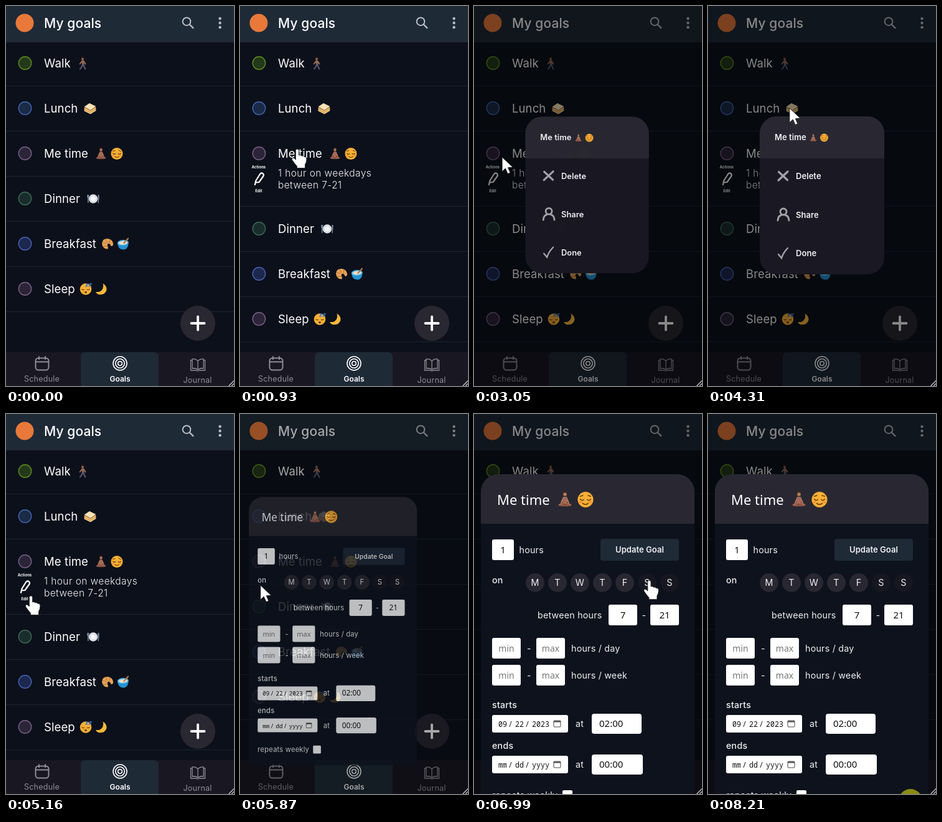
An HTML page that plays this animation: 366x606 px, repeating every 8.29 s.

```html
<!DOCTYPE html>
<html lang="en">
<head>
<meta charset="utf-8">
<title>My goals</title>
<style>
  html, body { margin: 0; width: 100%; height: 100%; overflow: hidden; background: #0c101b; }
  svg { display: block; }
  text { font-family: Inter, sans-serif; fill: #fff; white-space: pre; }
  .title { font-size: 21px; font-weight: 500; letter-spacing: .1px; }
  .row { font-size: 18.5px; letter-spacing: .1px; }
  .sub { font-size: 15.5px; font-weight: 300; letter-spacing: .4px; fill: #f2f2f4; }
  .tiny { font-size: 6px; font-weight: 700; text-anchor: middle; }
  .nav { font-size: 12.6px; letter-spacing: .2px; text-anchor: middle; fill: #8d8d96; }
  .on { font-weight: 600; font-size: 12px; letter-spacing: 0; fill: #fff; }
  .menu { font-size: 13px; font-weight: 600; letter-spacing: .05px; fill: #f0f0f2; }
  .form { font-size: 14.3px; letter-spacing: .2px; fill: #f0f0f2; }
  .mid { text-anchor: middle; }
  .bold { font-weight: 500; }
  .head { font: 22px "Noto Sans", sans-serif; }
  .field { font: 15px "Noto Sans", sans-serif; fill: #111; }
  .hint { font-size: 14px; fill: #777; }
  .date { font: 11.7px "Noto Sans Mono", monospace; fill: #111; }
</style>
</head>
<body>
<svg id="stage" width="366" height="606" viewBox="0 0 366 606">
  <defs>
    <g id="walk" fill="none" stroke-linecap="round" stroke-linejoin="round">
      <circle cy="-7.2" r="2" fill="#a86f4c"/>
      <path d="M-1.6-8.2Q0-10.6 2-8" stroke="#3a2822" stroke-width="1.6"/>
      <path d="M.3-3.5L.6 1.5" stroke="#7d6a6c" stroke-width="3.6"/>
      <path d="M-1-3.5L-4.4.8M1.7-3.5L4.6 1" stroke="#b0744e" stroke-width="1.7"/>
      <path d="M.3 2L-1.2 5L-4 8.8M1 2L2.6 5.3L4.2 9" stroke="#5b5a70" stroke-width="2.1"/>
    </g>
    <g id="sandwich">
      <path d="M-9.3-2L0-7L9.3-2V3.4L.5 9L-9.3 4Z" fill="#a9683a"/>
      <path d="M-9.3-3L-1-8.4L9.3-3.4L.5 2.4Z" fill="#f8e3b4"/>
      <path d="M-9.3-.4L.5 4.6L9.3-1" fill="none" stroke="#f2dcae" stroke-width="1.3"/>
      <path d="M-9.3 1.4L.5 6.3L9.3.8" fill="none" stroke="#f0bb3c" stroke-width="1.3"/>
      <path d="M-9.3 3.2L.5 8.1L9.3 2.6" fill="none" stroke="#f2dcae" stroke-width="1.3"/>
    </g>
    <g id="calm">
      <path d="M-2.4-5.8Q-2.8-9.4 0-9.4T2.4-5.8Z" fill="#4a2f28"/>
      <circle cy="-5.8" r="2.1" fill="#b57b58"/>
      <path d="M-2.2-3H2.2L5.4 4.4L4 5.2L2.3 2V5H-2.3V2L-4 5.2L-5.4 4.4Z" fill="#b57b58"/>
      <path d="M-2.2-3H2.2L2.6 4H-2.6Z" fill="#a3685c"/>
      <path d="M-8.2 7Q-5 3.4 0 4.4Q5 3.4 8.2 7Q6 9 0 8.2Q-6 9-8.2 7Z" fill="#a8654f"/>
      <path d="M-6.5 8L2 5.8M6.5 8L-2 5.8" stroke="#7c4a3c" fill="none"/>
    </g>
    <g id="relief">
      <circle r="9.5" fill="#fbb034"/>
      <g fill="none" stroke="#6b3f14" stroke-width="1.2" stroke-linecap="round">
        <path d="M-6.4-.5Q-4.2 2-2 0M6.4-.5Q4.2 2 2 0M-3.4 4.4Q0 7.4 3.4 4.4"/>
        <path d="M-6.4-4L-3.2-5M6.4-4L3.2-5"/>
      </g>
      <path d="M-7.6 3h3M4.6 3h3" stroke="#ee7f3a" stroke-width="1.6"/>
    </g>
    <g id="plate">
      <circle r="7.2" fill="#dfe3e9"/>
      <circle r="4.8" fill="#f4f5f8" stroke="#c4cad3" stroke-width=".7"/>
      <path d="M-8.2-6.5V6.5M8.2-6.5V6.5" stroke="#8296aa" stroke-width="1.4"/>
      <path d="M-9.2-6.5V-2H-7.2V-6.5M9-6V1H8" fill="none" stroke="#8296aa"/>
    </g>
    <g id="croissant">
      <path d="M-9-1Q-8-8.6 0-8.4Q8-7.6 9.2 0Q9 3.8 5.6 3.4Q4.6-.4 1.4-.8Q-1 .2 0 3.4Q1.6 5.4.6 8Q-8 8.6-9-1Z" fill="#e6a356"/>
      <path d="M-8.2-3L-2-.6M-3.6-7.6L0-2M4-7L3-1M-7.4 4.2L-.6 3.2" stroke="#b06f33" fill="none"/>
    </g>
    <g id="bowl">
      <path d="M-9-2.5Q-8.6 9 1 9Q8.6 8.4 8.6-2.5Z" fill="#2492d3"/>
      <ellipse cy="-2" rx="9" ry="4.4" fill="#4fb5e6" transform="rotate(-4)"/>
      <ellipse cy="-1.8" rx="7" ry="2.9" fill="#eadfce" transform="rotate(-4)"/>
      <path d="M1.4-1.4L8-8.8" stroke="#b87945" stroke-width="2.2" stroke-linecap="round"/>
    </g>
    <g id="sleepy">
      <circle r="9.3" fill="#fbb034"/>
      <path d="M-6.5 0Q-4.5 2-2.2 .4M2 .4Q4.2 2 6.2 0" fill="none" stroke="#6b3f14" stroke-width="1.2"/>
      <ellipse cy="5" rx="2" ry="1.7" fill="#6b3f14"/>
      <path d="M0-8h3.4L0-4.6h3.4M5.4-8.6h3.6L5.4-5h3.6" fill="none" stroke="#3f79c9" stroke-width="1.3"/>
    </g>
    <path id="moon" d="M2.4-9Q9.4-5 8.4 1.8Q6 9-2.2 8.8Q-7 8.2-9 4.4Q-1.6 5.4 1.6.4Q4.2-4 2.4-9Z" fill="#f9b93a"/>
  </defs>
  <g id="page"></g>
  <rect id="mask" width="366" height="606" fill="#000"/>
  <g id="menu"></g>
  <g id="form"></g>
  <circle id="halo" cx="325" cy="617" r="19" fill="#8b8a14"/>
  <g id="cursor" fill="#fff" stroke="#111" stroke-width=".8" stroke-linejoin="round">
    <path id="arrow" d="M0 0V23L5.3 18L9.2 26.5L13 24.8L9.4 16.6L17 16Z"/>
    <path id="hand" transform="translate(1 0)" d="M-2.6 2.6a2.6 2.6 0 0 1 5.2 0V10Q5.4 8.6 6.8 11Q9.6 10 10.9 12.4Q15 12 15 16.4Q15 21 12.5 25V30.5H-.5V27.5Q-4 24-8.3 17.6Q-9.4 14.6-7 14Q-5 14-2.6 17Z"/>
  </g>
  <path d="M357.5 606L366 597.5M362 606L366 602" stroke="#c9c9cc" stroke-width="1.3"/>
</svg>
<script>
const LOOP = 8290, GROW = 48;
const $ = id => document.getElementById(id);
const clamp = v => Math.max(0, Math.min(1, v));

const text = (x, y, cls, s) => `<text x="${x}" y="${y}" class="${cls}">${s}</text>`;
const box = (x, y, w, h, r, fill) =>
  `<rect x="${x}" y="${y}" width="${w}" height="${h}" rx="${r}" fill="${fill}"/>`;
const dot = (x, y, r, attrs) => `<circle cx="${x}" cy="${y}" r="${r}" ${attrs}/>`;
const line = (d, color, w, extra = '') =>
  `<path d="${d}" fill="none" stroke="${color}" stroke-width="${w}" ${extra}/>`;
const emoji = (id, x, y, s = 1) =>
  `<use href="#${id}" transform="translate(${x} ${y}) scale(${s})"/>`;

const goals = [
  ['Walk', '#5f8f22', '#24391a', [['walk', 123]]],
  ['Lunch', '#4066b0', '#1a2b47', [['sandwich', 135]]],
  ['Me time', '#7a6285', '#2c2438', [['calm', 152.5], ['relief', 178]]],
  ['Dinner', '#3a6b55', '#1a2d2d', [['plate', 140]]],
  ['Breakfast', '#4863b6', '#1c284e', [['croissant', 163], ['bowl', 188]]],
  ['Sleep', '#7a6285', '#2c2438', [['sleepy', 128], ['moon', 153]]],
];

function goalRow([name, edge, fill, icons], i) {
  const y = 91 + 72 * i;
  return dot(30.5, y, 10.2, `fill="${fill}" stroke="${edge}" stroke-width="1.4"`) +
    text(61, y + 7, 'row', name) + icons.map(([id, x]) => emoji(id, x, y + .5)).join('');
}
const rule = i => line(`M0 ${127.5 + 72 * i}H366`, '#1d2430', 1);

function header() {
  const c = '#b8bec6';
  return box(0, 0, 366, 58, 0, '#1f2a37') + dot(30, 27, 14.5, 'fill="#e8793a"') +
    text(61, 35, 'title', 'My goals') +
    dot(290, 24.7, 6.3, `fill="none" stroke="${c}" stroke-width="2"`) +
    line('M294.8 29.5L301 35.7', c, 2.4) +
    [20, 27, 34].map(y => dot(343.5, y, 2.2, `fill="${c}"`)).join('');
}

function navBar() {
  const c = '#8d8d96';
  return box(0, 552, 366, 54, 0, '#191722') +
    '<path d="M120 606V560q0-8 8-8H237q8 0 8 8V606Z" fill="#1f2a37"/>' +
    `<rect x="47.5" y="561.5" width="21" height="19" rx="4.5" fill="none" stroke="${c}" stroke-width="2"/>` +
    line('M48 567.5H68M53 558.5V564M63 558.5V564', c, 2) +
    [11, 7.2, 3.3].map(r => dot(183, 570, r, 'fill="none" stroke="#fff" stroke-width="1.6"')).join('') +
    line('M308 566Q304 562 299 563V578Q304 577 308 580Q312 577 317 578V563Q312 562 308 566V580M299 565H296.5V581H305L308 582L311 581H319.5V565H317', c, 1.3) +
    text(57.5, 599, 'nav', 'Schedule') + text(183, 599, 'nav on', 'Goals') +
    text(307.5, 601, 'nav', 'Journal');
}

function details() {
  return `<svg id="details" y="247" width="366" height="72"><g transform="translate(0 -247)">
    ${text(30, 259, 'tiny', 'Actions')}
    ${line('M24 285L25.5 278.5L32.5 267.5Q35 265.5 37 267.5T37 272L30.5 281L25.5 281.5', '#fff', 2.2, 'stroke-linejoin="round" stroke-linecap="round"')}
    ${text(30, 297, 'tiny', 'Edit')}
    ${text(61, 272, 'sub', '1 hour on weekdays')}${text(61, 291, 'sub', 'between 7-21')}
    </g></svg>`;
}

$('page').innerHTML = box(0, 0, 366, 606, 0, '#0c101b') +
  goals.slice(0, 3).map(goalRow).join('') + rule(0) + rule(1) + details() +
  '<g id="lower">' + goals.slice(3).map((g, i) => goalRow(g, i + 3)).join('') +
  [2, 3, 4, 5].map(rule).join('') + '</g>' + header() + navBar() +
  dot(308, 506, 28, 'fill="#292731"') +
  line('M297.5 506H318.5M308 495.5V516.5', '#fff', 3.8, 'stroke-linecap="round"');

const grey = '#a3a3a7';
$('menu').innerHTML = box(83, 176, 200, 252, 27, '#191823') +
  '<path d="M83 243V203a27 27 0 0 1 27-27H256a27 27 0 0 1 27 27V243Z" fill="#292832"/>' +
  text(107, 214, 'menu', 'Me time') + emoji('calm', 169, 210, .66) + emoji('relief', 186.5, 210, .68) +
  line('M113.5 264.5L127.5 277.5M128 264L113 278', grey, 3.2, 'stroke-linecap="round"') +
  dot(121, 328, 5, `fill="none" stroke="${grey}" stroke-width="2.8"`) +
  line('M112 342Q112.5 334.5 118 333.5M124 333.5Q129.5 334.5 130 342', grey, 2.8, 'stroke-linecap="round"') +
  line('M113 396L118 402Q121 393 128 386', grey, 2.4, 'stroke-linecap="round"') +
  ['Delete', 'Share', 'Done'].map((s, i) => text(141, 276 + 61.5 * i, 'menu', s)).join('');

const field = (x, y, w, h, s, cls = '') =>
  box(x, y, w, h, 3, '#fff') + text(x + w / 2, y + h / 2 + 5.4, 'field mid ' + cls, s);

function limits(y, unit) {
  return field(29, y, 46, 33, 'min', 'hint') + text(85, y + 22, 'form', '-') +
    field(100, y, 46, 33, 'max', 'hint') + text(156, y + 22, 'form', 'hours / ' + unit);
}

function moment(y, label, parts, time, w) {
  const [a, b, c] = parts;
  return text(29, y - 11, 'form bold', label) + box(29, y, 122, 28, 3, '#fff') +
    [[39, a], [55, '/'], [66, b], [82, '/'], [93, c]].map(([x, s]) => text(x, y + 19, 'date', s)).join('') +
    `<rect x="128" y="${y + 9}" width="11" height="10" rx="1" fill="none" stroke="#444"/>` +
    line(`M128 ${y + 10.5}H139`, '#444', 2) +
    text(163, y + 19, 'form', 'at') + box(189, y - 2, w, 32, 4, '#fff') +
    text(201, y + 19, 'field', time);
}

$('form').innerHTML =
  '<path d="M11 640V124a28 28 0 0 1 28-28H326a28 28 0 0 1 28 28V640Z" fill="#0d121d"/>' +
  '<path d="M11 175V124a28 28 0 0 1 28-28H326a28 28 0 0 1 28 28V175Z" fill="#292832"/>' +
  text(37, 145, 'head', 'Me time') + emoji('calm', 146, 136, 1.32) + emoji('relief', 179, 136.5, 1.32) +
  '<rect id="caret" x="195" y="121" width="1.2" height="30" fill="#fff"/>' +
  field(29, 200, 35, 33, '1') + text(72.5, 222, 'form', 'hours') +
  box(203, 199, 126, 35, 4, '#1f2a37') + text(266, 221, 'menu mid', 'Update Goal') +
  text(29, 270, 'form bold', 'on') +
  [...'MTWTFSS'].map((d, i) => dot(98 + 36 * i, 269, 15, `fill="${i < 5 ? '#292832' : '#171722'}"`) +
    text(98 + 36 * i, 274, 'form mid', d)).join('') +
  text(102, 326, 'form', 'between hours') + field(216, 304, 46, 33, '7') +
  text(269.5, 326, 'form', '-') + field(283, 304, 46, 33, '21') +
  limits(357, 'day') + limits(400, 'week') +
  moment(480, 'starts', ['09', '22', '2023'], '02:00', 80) +
  moment(545, 'ends', ['mm', 'dd', 'yyyy'], '00:00', 82) +
  text(29, 613, 'form', 'repeats weekly') + box(142, 600, 16, 16, 2, '#fff');

// Cubic bezier easing, solved by bisection
const bezier = (x1, y1, x2, y2) => p => {
  if (p <= 0 || p >= 1) return clamp(p);
  const at = (a, b, u) => 3 * a * u * (1 - u) ** 2 + 3 * b * u * u * (1 - u) + u ** 3;
  let lo = 0, hi = 1;
  for (let i = 0; i < 24; i++) {
    const u = (lo + hi) / 2;
    if (at(x1, x2, u) < p) lo = u; else hi = u;
  }
  return at(y1, y2, lo);
};
const easeOut = bezier(.08, .82, .17, 1);
const easeIn = bezier(.78, .14, .15, .86);
const smooth = bezier(.4, 0, .2, 1);

// Pointer keys: time, x, y, hand
const keys = [
  [60, 330, 612, 0], [300, 230, 420, 1], [560, 105, 245, 1], [900, 94, 226, 1],
  [1300, 55, 252, 1], [1710, 28, 291, 1], [1740, 30, 292, 1], [1840, 31, 299, 1],
  [2010, 31, 299, 1], [2500, 24, 250, 1], [2700, 33, 216, 1], [2810, 29, 228, 1],
  [2840, 30, 236, 0], [3050, 45, 241, 0], [3660, 127, 272, 1], [4000, 185, 418, 1],
  [4250, 140, 185, 0], [4310, 131, 163, 0], [4490, 120, 150, 0], [4560, 120, 150, 0],
  [4750, 98, 200, 1], [5160, 39, 290, 1], [5350, 32, 277, 1], [5400, 32, 276, 1],
  [5500, 23, 261, 1], [5580, 27, 266, 1], [5740, 27, 266, 0], [6050, 41, 283, 0],
  [6560, 84, 278, 0], [6640, 100, 272, 1], [7000, 285, 265, 1], [7100, 270, 230, 0],
  [7430, 205, 100, 0], [7580, 345, 418, 0], [7720, 345, 420, 0], [8010, 330, 620, 0],
];

function movePointer(t) {
  const i = keys.findIndex((k, n) => keys[n + 1] && t >= k[0] && t < keys[n + 1][0]);
  show('cursor', i >= 0);
  if (i < 0) return;
  const [t0, x0, y0, hand] = keys[i], [t1, x1, y1] = keys[i + 1], p = (t - t0) / (t1 - t0);
  $('cursor').setAttribute('transform', `translate(${x0 + (x1 - x0) * p} ${y0 + (y1 - y0) * p})`);
  show('hand', hand);
  show('arrow', !hand);
}

function show(id, on) { $(id).style.display = on ? '' : 'none'; }

function zoom(id, amount, ox, oy, opacity) {
  show(id, opacity > 0);
  const s = .2 + .8 * amount;
  $(id).setAttribute('transform', `translate(${ox * (1 - s)} ${oy * (1 - s)}) scale(${s})`);
  $(id).setAttribute('opacity', opacity);
}

function draw(t) {
  const open = t < 5820 ? smooth((t - 580) / 270) : 0;
  $('lower').setAttribute('transform', `translate(0 ${GROW * open})`);
  $('details').setAttribute('height', 24 + GROW * open);
  $('details').setAttribute('opacity', open);

  const menuIn = easeOut((t - 2840) / 300), menuOut = easeIn((t - 4560) / 260);
  const menu = menuIn * (1 - menuOut);
  zoom('menu', menu, 22, 240, menu);

  const form = easeOut((t - 5822) / 300);
  zoom('form', form, 26, 266, form);
  $('mask').setAttribute('opacity', .47 * Math.max(menu, form));

  show('caret', (t >= 6000 && t < 6500) || (t >= 7000 && t < 7500));
  show('halo', t >= 8210);
  movePointer(t);
}

const start = performance.now();
function tick() {
  draw((performance.now() - start) % LOOP);
  requestAnimationFrame(tick);
}
draw(0);
requestAnimationFrame(tick);
</script>
</body>
</html>
```
